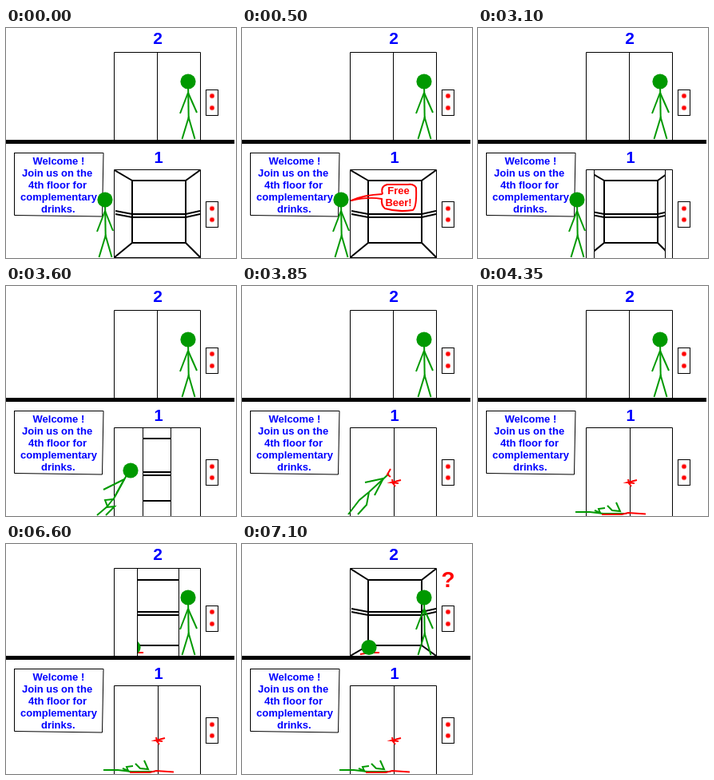
An HTML page with a canvas that plays this animation: 288x288 px, repeating every 8 s.

```html
<!DOCTYPE html>
<html lang="en">
<head>
<meta charset="utf-8">
<title>Elevator</title>
<style>
html, body { margin: 0; width: 100%; height: 100%; overflow: hidden; background: #fff; }
canvas { display: block; width: 288px; height: 288px; }
</style>
</head>
<body>
<canvas id="stage" width="288" height="288"></canvas>
<script>
const ctx = document.getElementById('stage').getContext('2d');
const GREEN = '#009900', RED = '#ff0000', BLUE = '#0000ff', BLACK = '#000';
const LOOP = 8000;

// Points are given flat: x, y, x, y ...
function line(color, width, ...p) {
  ctx.strokeStyle = color;
  ctx.lineWidth = width;
  ctx.beginPath();
  for (let i = 0; i < p.length; i += 2) ctx.lineTo(p[i], p[i + 1]);
  ctx.stroke();
}

function disc(x, y, r, color) {
  ctx.fillStyle = color;
  ctx.beginPath();
  ctx.arc(x, y, r, 0, Math.PI * 2);
  ctx.fill();
}

function text(str, x, y, size, color, align = 'left') {
  ctx.font = `bold ${size}px "Liberation Sans", Arial, sans-serif`;
  ctx.textAlign = align;
  ctx.fillStyle = color;
  ctx.fillText(str, x, y);
}

const limb = (...p) => line(GREEN, 2, ...p);
const blood = (...p) => line(RED, 2, ...p);
const head = (x, y) => disc(x, y, 9.6, GREEN);

function panel(y, dots) {
  ctx.strokeStyle = BLACK;
  ctx.lineWidth = 1;
  ctx.strokeRect(250.5, y + 0.5, 15, 32);
  for (const d of dots) {
    disc(258, d, 3.4, '#ffb0b0');
    disc(258, d, 2.6, RED);
  }
}

// c: top, back (top of rear wall), rail, base (bottom of rear wall), bottom
function cabin(c) {
  const wall = (...p) => line(BLACK, 2, ...p);
  wall(158, c.back, 225, c.back, 225, c.base, 158, c.base, 158, c.back - 1);
  wall(136, c.top + 1, 158, c.back);
  wall(243, c.top + 1, 225, c.back);
  wall(136, c.bottom, 158, c.base);
  wall(243, c.bottom, 225, c.base);
  for (const y of [c.rail, c.rail + 4]) {
    wall(137, y - 4, 158, y, 225, y, 243, y - 4);
  }
}

function lift(c, left, right, inside) {
  if (right > left) {
    ctx.save();
    ctx.beginPath();
    ctx.rect(left, c.top, right - left, c.bottom - c.top + 1);
    ctx.clip();
    cabin(c);
    if (inside) inside();
    ctx.restore();
  }
  line(BLACK, 1, 135.5, c.bottom + 1, 135.5, c.top + 0.5, 243.5, c.top + 0.5, 243.5, c.bottom + 1);
  if (left > 136) line(BLACK, 1, left + 0.5, c.top, left + 0.5, c.bottom + 1);
  if (right < 243 && right > left) line(BLACK, 1, right + 0.5, c.top, right + 0.5, c.bottom + 1);
}

const UPPER = { top: 30, back: 45, rail: 85, base: 127, bottom: 140 };
const LOWER = { top: 177, back: 191, rail: 233, base: 269, bottom: 287 };

function sign() {
  line(BLACK, 1, 10.5, 156.5, 122, 156.5, 120.5, 236, 10.5, 234.5, 10.5, 156);
  text('Welcome !', 33.5, 171, 13, BLUE);
  text('Join us on the', 20, 186, 13, BLUE);
  text('4th floor for', 28, 201, 13, BLUE);
  text('complementary', 18, 216, 13, BLUE);
  text('drinks.', 44, 231, 13, BLUE);
}

function stander(x, y, hand) {
  limb(x, y, x + 0.7, y + 46);
  limb(x, y + 14, x - 10, y + 40);
  limb(x, y + 14, ...hand);
  limb(x - 7.5, y + 72, x + 0.7, y + 45, x + 8.5, y + 72);
  head(x, y);
}

function bubble() {
  ctx.strokeStyle = RED;
  ctx.lineWidth = 2;
  ctx.lineJoin = 'round';
  ctx.beginPath();
  ctx.moveTo(176, 208);
  ctx.quadraticCurveTo(152, 209, 137, 216);
  ctx.quadraticCurveTo(158, 211, 175, 214);
  ctx.quadraticCurveTo(174, 222, 179, 226);
  ctx.quadraticCurveTo(196, 231, 214, 228);
  ctx.quadraticCurveTo(219, 224, 218, 200);
  ctx.quadraticCurveTo(215, 195, 208, 196);
  ctx.lineTo(182, 196);
  ctx.quadraticCurveTo(173, 198, 176, 208);
  ctx.stroke();
  ctx.lineJoin = 'miter';
  text('Free', 196, 208, 13, RED, 'center');
  text('Beer!', 196, 223, 13, RED, 'center');
}

function leaning() {
  limb(151, 237, 134, 268);
  limb(148, 242, 122, 255);
  limb(148, 242, 136, 264);
  limb(134, 267, 124, 268, 127, 276, 114, 287);
  limb(134, 267, 126, 277, 136, 276, 125, 287);
  head(156, 231);
}

function splash() {
  blood(199, 243, 187, 246, 196, 247);
  blood(188, 242, 189, 247, 192, 251);
}

function beheaded() {
  limb(184, 235, 159, 258);
  limb(177, 241, 154, 246);
  limb(177, 241, 166, 262);
  limb(159, 258, 147, 268, 133, 286);
  limb(159, 258, 156, 274, 145, 286);
  blood(186, 229, 182, 236, 186, 239);
}

function collapsing() {
  limb(183, 271, 154, 274);
  limb(176, 272, 168, 284);
  limb(174, 272, 180, 284);
  limb(154, 274, 147, 284, 132, 286);
  limb(154, 274, 158, 285, 143, 286);
  blood(182, 267, 185, 271, 184, 278);
}

function fallen() {
  limb(122, 283, 140, 283, 157, 285, 186, 285);
  limb(146, 281, 153, 284, 151, 279, 159, 278);
  limb(162, 275, 168, 281, 178, 282, 173, 271);
  blood(155, 286, 180, 286, 188, 284, 210, 285.5);
}

function severed() {
  blood(148, 138, 160, 136, 172, 136);
  head(159, 129.5);
}

function upperGap(t) {
  if (t < 6350) return [189, 189];
  if (t < 6600) return [176, 200];
  if (t < 6850) return [164, 216];
  return [136, 243];
}

function lowerGap(t) {
  if (t < 3100) return [136, 243];
  if (t < 3350) return [145, 234];
  if (t < 3850) return [171, 206];
  return [190, 190];
}

function greeter(t) {
  if (t < 3600) {
    const reaching = t >= 3350;
    stander(124, 215, reaching ? [146, 238] : [134, 254]);
    if (t >= 500 && t < 2500) bubble();
  } else if (t < 3850) leaning();
  else {
    splash();
    if (t < 4100) beheaded();
    else if (t < 4350) collapsing();
    else fallen();
  }
}

function draw(t) {
  ctx.fillStyle = '#fff';
  ctx.fillRect(0, 0, 288, 288);

  text('2', 190, 20, 21, BLUE, 'center');
  lift(UPPER, ...upperGap(t), severed);
  panel(77, [85, 100]);
  const pressing = t >= 2500 && t < 3100;
  stander(228, 67, pressing ? [239, 91, 258, 86] : [239, 106]);
  if (t >= 7100) text('?', 258, 54, 28, RED, 'center');

  ctx.fillStyle = BLACK;
  ctx.fillRect(0, 140, 286, 5);

  text('1', 191, 169, 20, BLUE, 'center');
  sign();
  lift(LOWER, ...lowerGap(t));
  if (t < 3100) line(BLACK, 1, 135, 287.5, 244, 287.5);
  panel(217, [226, 240]);
  greeter(t);
}

const start = performance.now();
function tick() {
  draw((performance.now() - start) % LOOP);
  requestAnimationFrame(tick);
}
tick();
</script>
</body>
</html>
```
